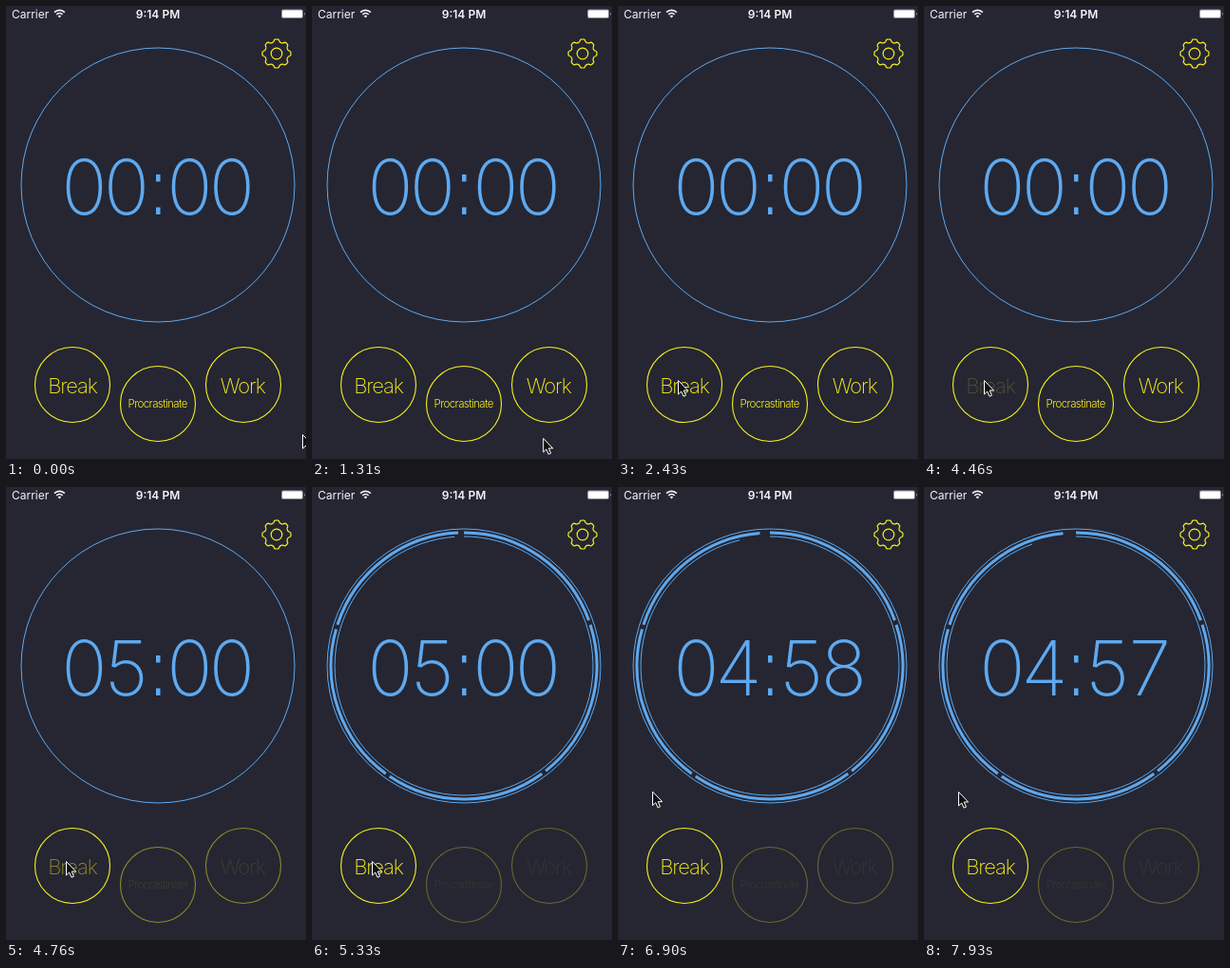
An HTML page that plays this animation: 316 px wide and 476 px high, repeating every 7990 ms.

```html
<!DOCTYPE html>
<html lang="en">
<head>
<meta charset="utf-8">
<title>Timer</title>
<style>
  html, body { margin: 0; width: 100%; height: 100%; overflow: hidden; background: #252632; }
  svg { display: block; width: 316px; height: 476px; }
  text { font-family: Inter, "Liberation Sans", sans-serif; text-anchor: middle; }
  .line { fill: none; stroke: #5ea9f0; }
  .digits { font-size: 80px; font-weight: 200; fill: #5ea9f0; }
  .button circle { fill: none; stroke: #f9f01e; stroke-width: 1.1; }
  .button text { fill: #f9f01e; font-size: 22px; font-weight: 200; letter-spacing: -1.1px; }
  .button .small { font-size: 11.5px; font-weight: 300; letter-spacing: -.6px; }
  .status { font-size: 12px; fill: #f4f4f6; }
</style>
</head>
<body>
<svg viewBox="0 0 316 476">
  <rect width="316" height="476" fill="#252632"/>

  <g class="status">
    <text x="6" y="13" style="text-anchor:start">Carrier</text>
    <text x="160" y="13" font-weight="600">9:14 PM</text>
    <g fill="none" stroke="#f4f4f6" stroke-width="1.7">
      <path d="M51 6.7A7.6 7.6 0 0 1 61.8 6.7M53.2 9A4.6 4.6 0 0 1 59.6 9"/>
      <path d="M56.4 12.6L54.6 10.6A2.6 2.6 0 0 1 58.2 10.6Z" fill="#f4f4f6" stroke="none"/>
    </g>
    <rect x="290" y="3.5" width="23" height="9.5" rx="2" fill="#8d8e95"/>
    <rect x="291" y="4.5" width="21" height="7.5" rx="1.2" fill="#fff"/>
    <path d="M314 6.5Q315.6 8.2 314 10Z" fill="#c0c0c5"/>
  </g>

  <g fill="none" stroke="#f9f01e" stroke-width="1.2" stroke-linejoin="round" transform="translate(285 50)">
    <path id="gear"/>
    <circle r="5.8"/>
  </g>

  <circle class="line" cx="160" cy="188" r="144"/>
  <path class="line" id="minutes" stroke-width="3"/>
  <path class="line" id="seconds"/>

  <text class="digits" id="mm" x="82.5 127" y="219">00</text>
  <path d="M158 177h4.5v7.5h-4.5zM158 211.500h4.500v7.500h-4.500z" fill="#5ea9f0"/>
  <text class="digits" id="ss" x="193.5 238" y="219">00</text>

  <g class="button">
    <circle cx="70" cy="398" r="39.5"/>
    <text id="active" x="70" y="406.500">Break</text>
  </g>
  <g class="button idle">
    <circle cx="160" cy="418" r="39.5"/>
    <text class="small" x="159.700" y="422.300">Procrastinate</text>
  </g>
  <g class="button idle">
    <circle cx="250" cy="398" r="39.5"/>
    <text x="249.200" y="406.500">Work</text>
  </g>

  <path id="cursor" d="M.5 .5V15L3.700 12L6 17.200L8.400 16.200L6.200 11H10.600Z" fill="#111" stroke="#fff"/>
</svg>
<script>
const LOOP = 7990, PRESS = 4460, SWEEP = 4770, START = 4980, TICK = 5480;
const $ = id => document.getElementById(id);
const idle = [...document.querySelectorAll('.idle')];

// time, x, y of the pointer tip
const track = [
  [0, 312, 450], [50, 312, 450], [120, 304, 462], [180, 301, 471], [230, 300, 484],
  [1290, 242, 484], [1310, 243, 455], [1420, 262, 323], [1590, 262, 323],
  [1680, 263, 352], [1760, 254, 405], [1840, 245, 428], [1930, 222, 427],
  [2100, 140, 410], [2250, 82, 396], [2370, 64, 393], [2430, 63, 393],
  [6210, 63, 393], [6400, 57, 372], [6600, 43, 334], [6800, 36, 319],
  [6960, 36, 320], [LOOP, 36, 320]
];

const clamp = v => Math.max(0, Math.min(1, v));
const ramp = (t, from, span) => clamp((t - from) / span);
const ease = p => p * p * (3 - 2 * p);
const mix = (a, b, p) => a + (b - a) * p;

function polar(r, deg, cx = 160, cy = 188) {
  const a = deg * Math.PI / 180;
  return (cx + r * Math.sin(a)).toFixed(2) + ' ' + (cy - r * Math.cos(a)).toFixed(2);
}

function arc(r, from, to) {
  if (to <= from) return '';
  return `M${polar(r, from)}A${r} ${r} 0 ${to - from > 180 ? 1 : 0} 1 ${polar(r, to)}`;
}

function gearPath() {
  let d = '';
  for (let a = 0; a < 360; a += 45) {
    d += (a ? 'L' : 'M') + polar(14.4, a - 10, 0, 0) +
      'L' + polar(15, a - 6, 0, 0) +
      'A15 15 0 0 1 ' + polar(15, a + 6, 0, 0) +
      'L' + polar(14.4, a + 10, 0, 0) +
      'A3.6 3.6 0 0 0 ' + polar(14.4, a + 35, 0, 0);
  }
  return d + 'Z';
}

function pointer(t) {
  let i = 1;
  while (i < track.length - 1 && track[i][0] < t) i++;
  const a = track[i - 1], b = track[i], p = ramp(t, a[0], b[0] - a[0]);
  return [mix(a[1], b[1], p), mix(a[2], b[2], p)];
}

function drawRing(t) {
  const sweep = 358 * ramp(t, SWEEP, 500);
  const spent = Math.max(0, t - START) / 1000;
  const end = Math.min(sweep, 358 - 1.2 * spent);
  let d = '';
  for (let a = 0; a < 360; a += 72) d += arc(140, a, Math.min(a + 70, end));
  $('minutes').setAttribute('d', d);
  $('seconds').setAttribute('d', arc(136, 0, Math.min(sweep, 358 - 6 * spent)));
}

function drawDigits(t) {
  let left = t < PRESS + 60 ? 0 : 300;
  if (t >= TICK) left -= 1 + Math.floor((t - TICK) / 1000);
  const pad = n => String(n).padStart(2, '0');
  $('mm').textContent = pad(Math.floor(left / 60));
  $('ss').textContent = pad(left % 60);
}

function drawButtons(t) {
  const fade = mix(1, .32, ease(ramp(t, PRESS, 450)));
  const title = mix(1, .22, ramp(t, PRESS, 250));
  for (const g of idle) {
    g.setAttribute('opacity', fade);
    g.lastElementChild.setAttribute('opacity', title);
  }
  $('active').setAttribute('opacity', t < PRESS ? 1 : mix(.2, 1, ease(ramp(t, 4600, 400))));
}

function draw(t) {
  drawRing(t);
  drawDigits(t);
  drawButtons(t);
  $('cursor').setAttribute('transform', `translate(${pointer(t)})`);
}

$('gear').setAttribute('d', gearPath());
const begin = performance.now();
function frame() {
  draw((performance.now() - begin) % LOOP);
  requestAnimationFrame(frame);
}
frame();
</script>
</body>
</html>
```
